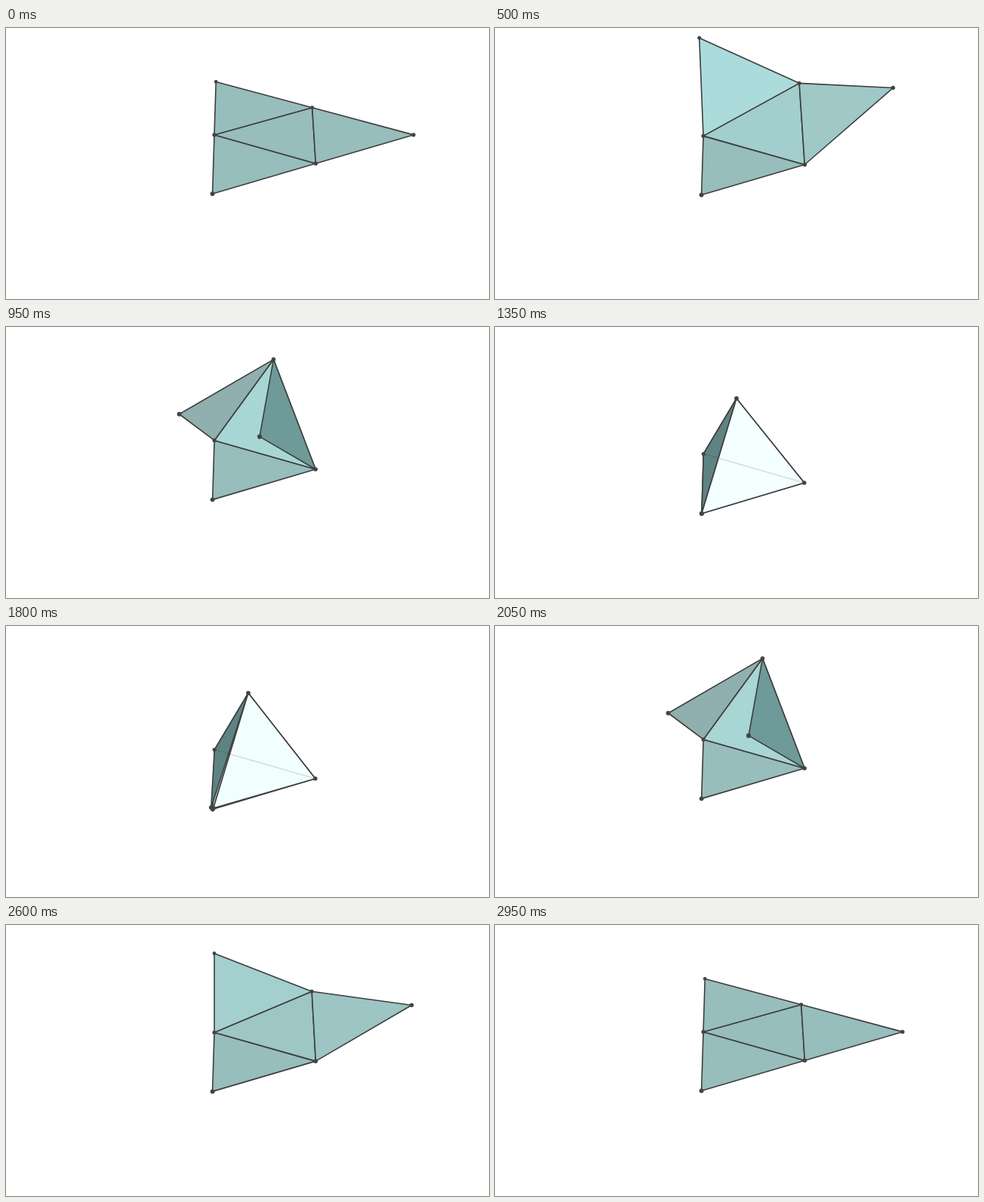
An HTML page with a canvas for the animation above (3 s loop, 640 px wide and 360 px high).

```html
<!DOCTYPE html>
<html>
<head>
<meta charset="utf-8">
<style>
  html, body { margin: 0; width: 100%; height: 100%; overflow: hidden; background: #fff; }
  canvas { display: block; }
</style>
</head>
<body>
<canvas id="stage" width="640" height="360"></canvas>
<script>
const ctx = document.getElementById('stage').getContext('2d');

const LOOP = 3000, STEP = 50;
const FOCAL = 2500, DIST = 15.97;          // camera, in edge lengths
const SIN = 0.5, COS = Math.sqrt(3) / 2;   // camera raised by 30 degrees
const TALL = Math.sqrt(3) / 2;             // height of a unit triangle
const CLOSED = Math.acos(-1 / 3);          // fold angle of the finished solid
const SINK = Math.sqrt(2 / 3) / 4;         // drop of the base when closed
const LINE = '#3e3e3e';

// [ms, share of the way]; played forwards, then backwards
const FOLD = [[0, 0], [50, 0], [200, .011], [350, .056], [500, .171], [600, .267], [700, .376],
  [950, .731], [1150, .968], [1200, .992], [1300, 1], [1500, 1]];
const DROP = [[0, 0], [50, 0], [350, .025], [500, .055], [700, .13], [900, .265], [950, .325],
  [1150, .72], [1200, .83], [1350, .985], [1450, 1], [1500, 1]];

// Smooth curve through the keys, flat at both ends
function curve(keys, t) {
  const slope = i => i < 1 || i > keys.length - 2 ? 0 :
    (keys[i + 1][1] - keys[i - 1][1]) / (keys[i + 1][0] - keys[i - 1][0]);
  let i = 0;
  while (i < keys.length - 2 && t > keys[i + 1][0]) i++;
  const [t0, a] = keys[i], [t1, b] = keys[i + 1];
  const w = t1 - t0, s = (t - t0) / w, r = 1 - s;
  const v = a * r * r * (1 + 2 * s) + b * s * s * (3 - 2 * s) +
    w * s * r * (r * slope(i) - s * slope(i + 1));
  return Math.min(1, Math.max(0, v));
}

const add = (a, b, k = 1) => a.map((v, i) => v + k * b[i]);
const scale = (a, k) => a.map(v => v * k);
const mid = (a, b) => scale(add(a, b), .5);

// Swing a new triangle about edge ab, away from the far corner of its neighbour
function hinge(a, b, far, normal, angle) {
  const m = mid(a, b), out = scale(add(m, far, -1), 1 / TALL);
  const c = Math.cos(angle), s = Math.sin(angle);
  return {
    tip: add(m, add(scale(out, c), normal, s), TALL),
    normal: add(scale(normal, c), out, -s)
  };
}

function project([x, y, z]) {
  const k = FOCAL / (DIST + y * COS - z * SIN);
  return { x: 320 + x * k, y: 180 - (y * SIN + z * COS) * k, k };
}

// Inner sides are lit evenly; outer sides are darker
function shade(n) {
  const d = n[2] * SIN - n[1] * COS;
  let r, g;
  if (d >= 0) {
    g = 150 + 78 * d;
    r = 152 + .64 * (g - 190);
  } else {
    const e = -d;
    g = 131 + 94 * (e - .167) + 425 * (e - .167) * (e - .4);
    r = .72 * g - 1;
  }
  return `rgb(${Math.round(r)},${Math.round(g)},${Math.round(g - 1)})`;
}

function path(points) {
  ctx.beginPath();
  points.forEach(p => ctx.lineTo(p.x, p.y));
}

function draw(t) {
  const u = t > LOOP / 2 ? LOOP - t : t;
  const angle = CLOSED * curve(FOLD, u);
  const z = -SINK * curve(DROP, u);

  const up = [0, 0, 1];
  const A = [-TALL / 3, .5, z], C = [TALL * 2 / 3, 0, z], R = [-TALL / 3, -.5, z];
  const main = hinge(A, C, R, up, angle), B = main.tip;
  const left = hinge(A, B, C, main.normal, angle);
  const right = hinge(B, C, A, main.normal, angle);

  const [a, b, c, r, p, q] = [A, B, C, R, left.tip, right.tip].map(project);

  ctx.fillStyle = '#fff';
  ctx.fillRect(0, 0, 640, 360);
  ctx.lineJoin = 'round';
  ctx.lineWidth = 1.6;
  ctx.strokeStyle = LINE;

  const faces = [[[a, r, c], up], [[a, b, c], main.normal],
    [[p, a, b], left.normal], [[q, b, c], right.normal]];
  for (const [points, normal] of faces) {
    path(points);
    ctx.closePath();
    ctx.fillStyle = shade(normal);
    ctx.fill();
    ctx.stroke();
  }

  // The base edge shows faintly through the front
  ctx.globalAlpha = .17;
  path([a, c]);
  ctx.stroke();
  ctx.globalAlpha = 1;

  ctx.fillStyle = '#444';
  for (const v of [p, a, b, q, c, r]) {
    ctx.beginPath();
    ctx.arc(v.x, v.y, 2.75 * (v.k / 156) ** 2, 0, Math.PI * 2);
    ctx.fill();
  }
}

const start = performance.now();
function tick() {
  const t = (performance.now() - start) % LOOP;
  draw(Math.floor(t / STEP) * STEP);
  requestAnimationFrame(tick);
}
tick();
</script>
</body>
</html>
```
